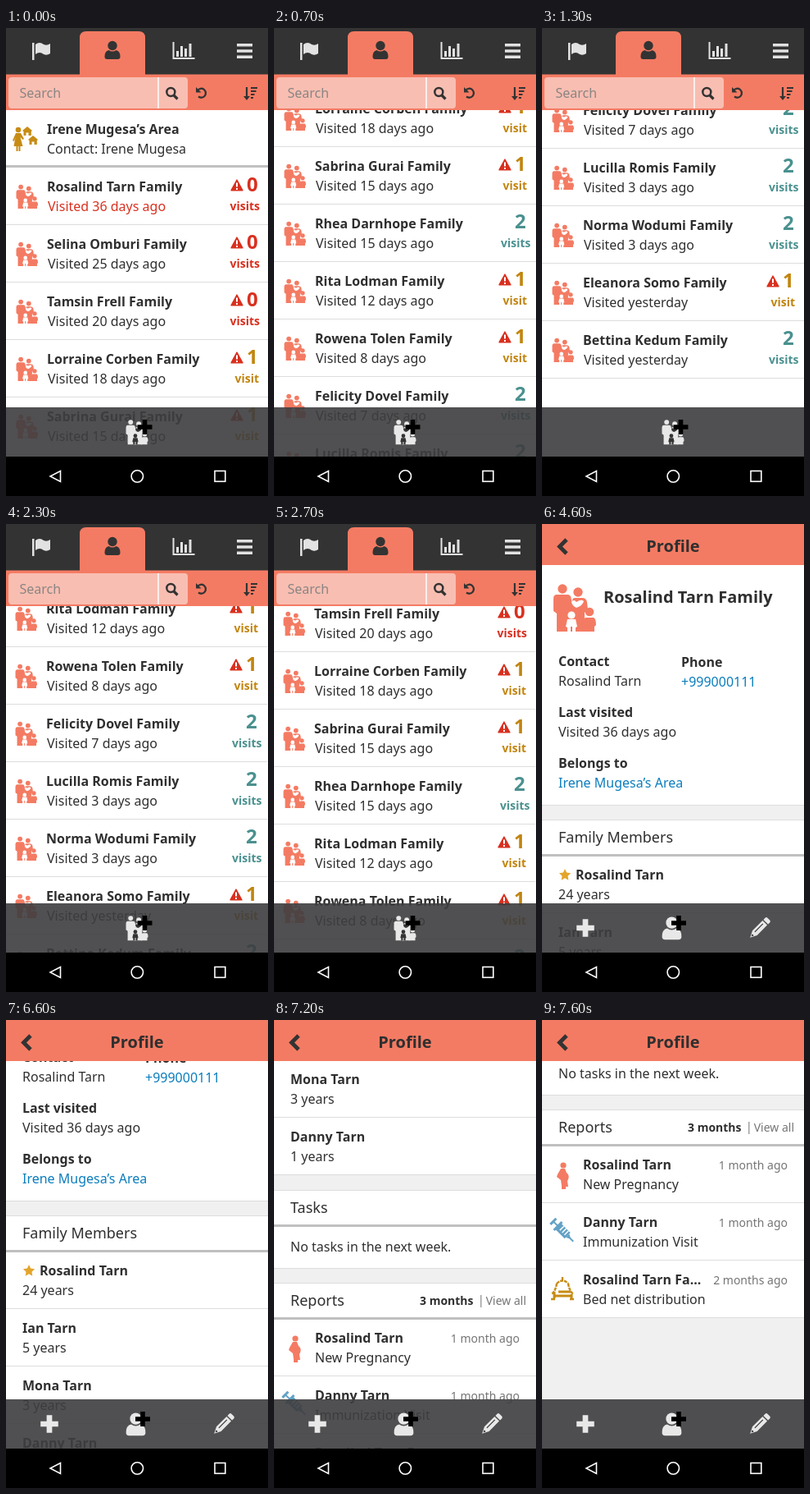
An HTML page that plays this animation: 320 px wide and 570 px high, repeating every 8000 ms.

```html
<!DOCTYPE html>
<html lang="en">
<head>
<meta charset="utf-8">
<title>Family list and profile</title>
<style>
  html, body { margin: 0; height: 100%; overflow: hidden; background: #fff; }
  svg { display: block; width: 100vw; height: 100vh; }
  text { font-family: "Noto Sans", sans-serif; font-size: 16px; fill: #2f2f2f; white-space: pre; }
  .b { font-weight: 700; }
  .s14 { font-size: 14px; }
  .s18 { font-size: 18px; }
  .s20 { font-size: 20px; }
  .s24 { font-size: 24px; }
  .end { text-anchor: end; }
  .mid { text-anchor: middle; }
  .red { fill: #d9301f; }
  .gold { fill: #c2850f; }
  .teal { fill: #4a918f; }
  .link { fill: #0a7dbd; }
  .grey { fill: #757575; }
  .hint { fill: #8a8583; }
  .icon { fill: currentColor; }
  .hole { fill: var(--hole, #fff); }
  .line { fill: none; stroke: currentColor; }
  .coral { color: #f47b63; }
  .ochre { color: #c78c14; }
  .amber { color: #e3a52a; }
  .blue { color: #63a2c6; }
  .pale { color: #e8e8e8; --hole: #333; }
  .dark { color: #333; }
</style>
</head>
<body>
<svg id="stage" viewBox="0 0 320 570">
  <defs>
    <g id="family" class="icon">
      <circle cx="12" cy="6" r="5.7"/>
      <path d="M5 13h13q4 0 4.500 4l2 10v31H5V36l-4-3V18q0-5 4-5z"/>
      <circle cx="31" cy="10" r="5.7"/>
      <path d="M27 17h9q5 0 6 5l1 9-4 4v23H20V32l4-5v-6q0-4 3-4z"/>
      <path class="hole" d="M23 22q3-4 6 0 6-4 9-1-1 5-9 8-5-2-6-7z"/>
      <circle cx="45" cy="34" r="5.3"/>
      <path d="M40 41h10q3 1 3 9l-2 2v6H36V46z"/>
      <circle class="hole" cx="23" cy="38" r="4.6"/>
      <path class="hole" d="M18 43h10l2 9-2 1v5h-4v-6h-2v6h-4v-5l-2-1z"/>
    </g>
    <g id="house" class="icon">
      <path d="M0 5L6 0l6 5-1.200 1V11H7.500V7.500h-3V11H1.500V6z"/>
    </g>
    <g id="area" class="icon">
      <circle cx="16" cy="124" r="3.300"/>
      <path d="M13 128h6l4 7-1.500 1-3-3 3 11h-3v6h-2v-6h-1v6h-2v-6h-3l2-11-1.500 5-2-1z"/>
      <use href="#house" x="21" y="120"/>
      <use href="#house" x="28" y="131"/>
    </g>
    <g id="warning">
      <path class="red" d="M282 185l7 12.800h-14z" stroke="#d9301f" stroke-width="1.400" stroke-linejoin="round"/>
      <path d="M282 188.500v5M282 195v2" stroke="#fff" stroke-width="2"/>
    </g>
    <path id="plus" class="icon" d="M-2.800-9h5.600v6.200h6.200v5.600h-6.200v6.200h-5.600v-6.200h-6.200v-5.600h6.200z"/>
    <g id="person" class="icon">
      <circle r="5.700" cy="-5.500"/>
      <path d="M-4.500 0Q0 3 4.500 0 9.500 1 9.500 8q0 3-3 3H-6.500q-3 0-3-3 0-7 5-8z"/>
    </g>
    <path id="star" class="icon" d="M0-7l2.100 4.500 5 .7-3.600 3.500.8 5L0 4.300-4.300 6.700l.8-5L-7.100-1.800l5-.7z"/>
    <g id="pregnant" class="icon">
      <circle cx="26" cy="24" r="3.600"/>
      <path d="M23 28h5l2 5q4 3 2 8l-1 2 1 7h-3v3h-5v-4l-1-7-5-4 1-3z"/>
    </g>
    <g id="syringe" class="icon" transform="translate(25.500 34) rotate(-45)">
      <path d="M-5-9H5V8H-5z"/>
      <path d="M-1-17h2v8h-2zM-5-18H5v3H-5zM-7-10H7v3H-7zM-3 8h6l-2 4v6h-2v-6z"/>
      <path class="hole" d="M-2-4h7v1.500h-7zM-2 0h7v1.500h-7zM-2 4h7v1.500h-7z"/>
    </g>
    <g id="bednet" class="line" stroke-width="2.400">
      <path d="M25 20v4M18 28q7-7 14 0M18 28q-1 8-6 13M32 28q1 8 6 13" stroke-dasharray="4 1"/>
      <path d="M15 46v-8M36 46v-5M15 43h21M20 38h15" stroke-width="3"/>
      <path d="M11 47h5M34 47h5"/>
    </g>
  </defs>

  <g id="listPage">
    <rect width="320" height="570" fill="#fff"/>
    <g id="list"></g>
    <rect width="320" height="57" fill="#333"/>
    <path d="M90 56.500V12q0-8 8-8h64q8 0 8 8v44.500h150V100H0V56.500z" fill="#f47b63"/>
    <g class="icon" color="#e2e2e2">
      <path d="M32 18h2.500v21H32zM36 20q5-4 10 0 4 2 8-1v12q-4 3-8 1-5-4-10 0z"/>
      <path d="M203.500 17h2v19h25v2h-27zM208 28h3v7h-3zM213 22h3v13h-3zM218 25h3v10h-3zM223.500 19h3v16h-3z"/>
      <path d="M282 19h19v3.500h-19zM282 26.200h19v3.500h-19zM282 33.500h19v3.500h-19z"/>
    </g>
    <use href="#person" class="dark" x="130" y="27"/>
    <rect x="3" y="60" width="219" height="38" rx="4" fill="#f9beb2"/>
    <rect x="185" y="60" width="2" height="38" fill="#fdeeeb"/>
    <text class="hint" x="16.500" y="85">Search</text>
    <g class="line dark">
      <circle cx="201.300" cy="78" r="5" stroke-width="2.500"/>
      <path d="M205 82l4.500 4.500" stroke-width="3.200"/>
      <path d="M234 76a5.500 5.500 0 1 1 1 7.500" stroke-width="2.300"/>
      <path d="M294 72v12" stroke-width="2.200"/>
      <path d="M299 73h8M299 77h6.500M299 81h4.500M299 85h3" stroke-width="2"/>
    </g>
    <path d="M232 72v6.500h6.500zM290 83h8l-4 5z" fill="#333"/>
  </g>

  <g id="profilePage">
    <rect width="320" height="570" fill="#f0f0f0"/>
    <g id="profile"></g>
    <rect width="320" height="50" fill="#f47b63"/>
    <path class="line dark" d="M30 19l-8.500 8.500L30 36" stroke-width="4.800"/>
    <text class="b s20 mid" x="160" y="34">Profile</text>
  </g>

  <rect y="462" width="320" height="60" fill="#3e3d40" fill-opacity=".9"/>
  <g id="listActions">
    <use href="#family" class="pale" transform="translate(146 477) scale(.52)"/>
    <use href="#plus" color="#000" x="169.500" y="486"/>
  </g>
  <g id="profileActions" class="pale">
    <use href="#plus" transform="translate(53 492) scale(1.200)"/>
    <use href="#person" transform="translate(158.500 492.500) scale(1.250)"/>
    <use href="#plus" color="#000" x="167" y="486"/>
    <g class="icon" transform="translate(265.500 492.500) rotate(45)">
      <path d="M-4-14q0-2 2-2h4q2 0 2 2v3h-8zM-4-9.500h8V8L0 16-4 8z"/>
      <path class="hole" d="M-1.500-7h1.200V7h-1.200zM-1.500 11h3L0 14z"/>
    </g>
  </g>
  <rect y="522" width="320" height="48" fill="#000"/>
  <g fill="none" stroke="#fff" stroke-width="1.600">
    <path d="M66.500 539.500v13L54 546z"/>
    <circle cx="160.300" cy="546" r="7.200"/>
    <rect x="255" y="539.500" width="12.800" height="12.800"/>
  </g>
</svg>
<script>
const $ = id => document.getElementById(id);
const text = (x, y, value, cls = '') => `<text x="${x}" y="${y}" class="${cls}">${value}</text>`;
const rect = (y, h, fill) => `<rect y="${y}" width="320" height="${h}" fill="${fill}"/>`;
const use = (id, x, y, cls = '') => `<use href="#${id}" x="${x}" y="${y}" class="${cls}"/>`;
const rowLine = top => rect(top + 69, 1, '#ddd');
const thickLine = y => rect(y, 3, '#c0c0c0');

const PERSON = 'Rosalind Tarn';
const AREA_OWNER = 'Irene Mugesa';
const families = [
  [PERSON, '36 days ago', 0], ['Selina Omburi', '25 days ago', 0],
  ['Tamsin Frell', '20 days ago', 0], ['Lorraine Corben', '18 days ago', 1],
  ['Sabrina Gurai', '15 days ago', 1], ['Rhea Darnhope', '15 days ago', 2],
  ['Rita Lodman', '12 days ago', 1], ['Rowena Tolen', '8 days ago', 1],
  ['Felicity Dovel', '7 days ago', 2], ['Lucilla Romis', '3 days ago', 2],
  ['Norma Wodumi', '3 days ago', 2], ['Eleanora Somo', 'yesterday', 1],
  ['Bettina Kedum', 'yesterday', 2]
];
const visitStyles = [['red', 310, 'visits'], ['gold', 309, 'visit'], ['teal', 313.5, 'visits']];

function familyRow([name, visited, count], i) {
  const top = 170 + i * 70;
  const [color, right, label] = visitStyles[count];
  return `<g class="coral"><use href="#family" transform="translate(12 ${top + 20.5}) scale(.51)"/></g>`
    + text(50, top + 29, name + ' Family', 'b')
    + text(51, top + 53, 'Visited ' + visited, i ? '' : 'red')
    + (count < 2 ? use('warning', 0, top - 170) : '')
    + text(294, top + 29, count, 'b s24 ' + color)
    + text(right, top + 52, label, 'b s14 end ' + color)
    + rowLine(top);
}

$('list').innerHTML =
  `<rect id="pressed" y="170" width="310" height="71" fill="#f0f0f0"/>`
  + use('area', -1, 0, 'ochre')
  + text(50, 129, AREA_OWNER + '’s Area', 'b')
  + text(50, 153, 'Contact: ' + AREA_OWNER)
  + thickLine(167)
  + families.map(familyRow).join('');

const panel = (top, bottom) => rect(top, bottom - top, '#fff')
  + rect(top, 1, '#ddd') + rect(bottom - 1, 1, '#ddd');
const section = (top, bottom, title) =>
  panel(top, bottom) + text(20, top + 28, title, 's18') + thickLine(top + 42);

function memberRow([name, age], i) {
  const top = 404 + i * 70;
  return (i ? '' : use('star', 28, 427, 'amber'))
    + text(i ? 20 : 41, top + 29, name, 'b')
    + text(20, top + 53, age + ' years')
    + rowLine(top);
}

function reportRow([icon, color, name, report, age], i) {
  const top = 859 + i * 70;
  return use(icon, 0, top, color)
    + text(50, top + 29, name, 'b')
    + text(50, top + 53, report)
    + text(300, top + 29, age + ' ago', 's14 end grey')
    + rowLine(top);
}

$('profile').innerHTML =
  panel(0, 343)
  + use('family', 13, 73, 'coral')
  + text(75, 96, PERSON + ' Family', 'b s20')
  + text(20, 173, 'Contact', 'b') + text(20, 197, PERSON)
  + text(170, 174, 'Phone', 'b') + text(170, 198, '+999000111', 'link')
  + text(20, 235, 'Last visited', 'b') + text(20, 259, 'Visited 36 days ago')
  + text(20, 297, 'Belongs to', 'b') + text(20, 321, AREA_OWNER + '’s Area', 'link')
  + section(360, 684, 'Family Members')
  + [[PERSON, 24], ['Ian Tarn', 5], ['Mona Tarn', 3], ['Danny Tarn', 1]].map(memberRow).join('')
  + section(702, 798, 'Tasks')
  + text(20, 777, 'No tasks in the next week.')
  + section(815, 1069, 'Reports')
  + text(178, 842, '3 months', 'b s14') + text(249, 841, '|', 's14 grey')
  + text(308, 842, 'View all', 's14 end grey')
  + [['pregnant', 'coral', PERSON, 'New Pregnancy', '1 month'],
     ['syringe', 'blue', 'Danny Tarn', 'Immunization Visit', '1 month'],
     ['bednet', 'ochre', PERSON + ' Fa...', 'Bed net distribution', '2 months']].map(reportRow).join('');

// Scrolling advances in 200 ms steps at constant speed and stops at the ends.
const LIST_END = 653, PROFILE_END = 706;
const steps = (t, start) => Math.max(0, Math.floor((t - start) / 200) + 1);
const listScroll = t => t < 2300
  ? Math.min(LIST_END, Math.floor(152.5 * steps(t, 500)))
  : Math.max(0, LIST_END - 143 * steps(t, 2300));
const profileScroll = t => t < 6600
  ? 0 : Math.min(PROFILE_END, Math.round(124.25 * steps(t, 6600) - 2));

const show = (id, on) => $(id).setAttribute('display', on ? 'inline' : 'none');
const move = (id, x, y) => $(id).setAttribute('transform', `translate(${x} ${y})`);

let start;
function draw(now) {
  start ??= now;
  const t = (now - start) % 8000;
  const onProfile = t >= 4600;
  show('listPage', !onProfile);
  show('listActions', !onProfile);
  show('profilePage', onProfile);
  show('profileActions', onProfile);
  show('pressed', t >= 4100);
  move('list', t >= 2300 && t < 3100 ? -1 : 0, -listScroll(t));
  move('profile', 0, -profileScroll(t));
  requestAnimationFrame(draw);
}
requestAnimationFrame(draw);
</script>
</body>
</html>
```
